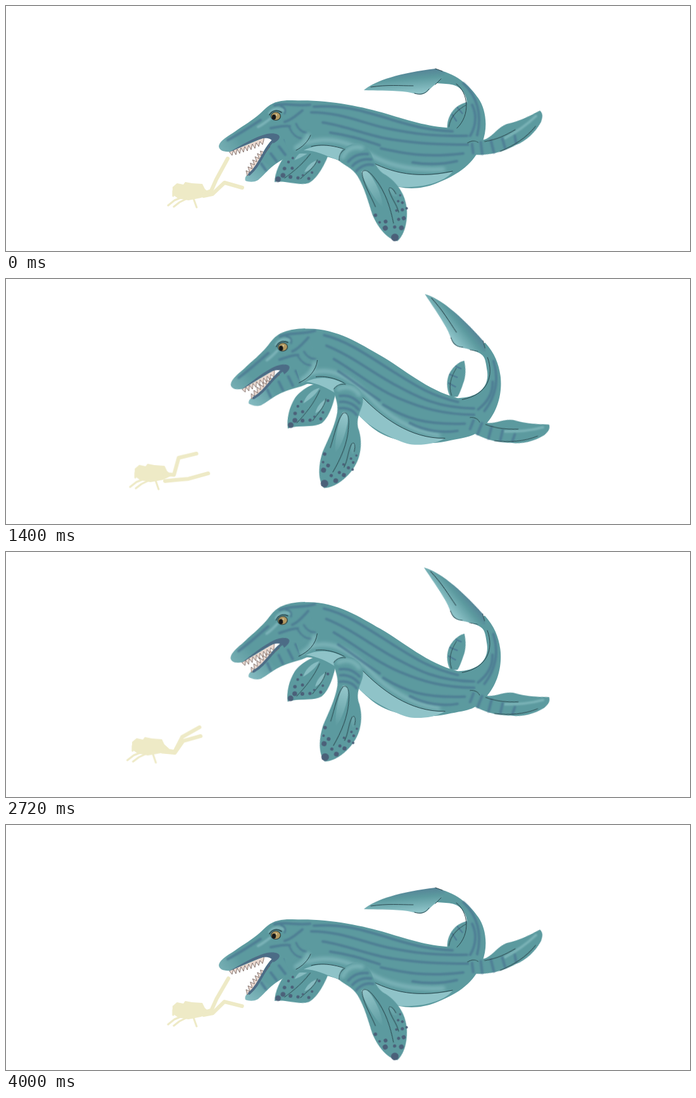
Animation of 1080x387 px, one loop 4040 ms. Source, as an HTML page without scripts:

```html
<!DOCTYPE html>
<html lang="en">
<head>
<meta charset="utf-8">
<title>Sea reptile chasing a diver</title>
<style>
  html, body { margin: 0; width: 100%; height: 100%; overflow: hidden; background: #fff; }
  svg { display: block; width: 100%; height: 100%; }

  /* Every part has three poses: --a low, --m middle, --b high. */
  .part, .morph, .swim { animation: part 4.04s infinite; }
  .morph { animation-name: morph; }
  .swim { animation-name: swim; }
  .kick { animation: morph-kick 1.01s infinite ease-in-out; }

  @keyframes part {
    0%, 100% { transform: var(--a); animation-timing-function: cubic-bezier(.47, 0, .745, .715); }
    24.75%, 77.5% { transform: var(--m); animation-timing-function: cubic-bezier(.39, .575, .565, 1); }
    51.1% { transform: var(--b); animation-timing-function: cubic-bezier(.47, 0, .745, .715); }
  }
  @keyframes morph {
    0%, 100% { d: var(--a); animation-timing-function: cubic-bezier(.47, 0, .745, .715); }
    24.75%, 77.5% { d: var(--m); animation-timing-function: cubic-bezier(.39, .575, .565, 1); }
    51.1% { d: var(--b); animation-timing-function: cubic-bezier(.47, 0, .745, .715); }
  }
  @keyframes morph-kick {
    0%, 100% { d: var(--a); }
    40% { d: var(--m); }
    78% { d: var(--b); }
  }
  @keyframes swim {
    0%, 100% { transform: translate(288px, 294px); animation-timing-function: ease-in; }
    24.75%, 75.5% { transform: translate(243px, 306px); animation-timing-function: linear; }
    51% { transform: translate(204px, 311px) rotate(2deg); animation-timing-function: ease-in; }
    86% { transform: translate(275px, 292px); animation-timing-function: ease-out; }
  }

  .skin { fill: #5c9a9f; }
  .pale { fill: #8fc3c8; }
  .stripe, .ink, .glow { fill: none; stroke-linecap: round; stroke-linejoin: round; }
  .stripe { stroke: #4a7391; stroke-width: 4; opacity: .72; }
  .glow { stroke: #90c4c8; stroke-width: 7; opacity: .6; }
  .ink { stroke: #29454c; stroke-width: 1; }
  .spot { fill: #4b6079; }
  .tooth { fill: #ead9d0; stroke: #6b5853; stroke-width: .8; stroke-linejoin: round; }

  .head { transform-origin: 426px 174px; --a: translate(0, 0) rotate(0deg); --m: translate(3px, -43px) rotate(-5.4deg); --b: translate(17px, -84px) rotate(-10.5deg); }
  .jaw { transform-origin: 428px 206px; --a: translate(0, 0) rotate(0deg); --m: translate(8px, -46px) rotate(6.7deg); --b: translate(25px, -85px) rotate(14.5deg); }
  .fluke { transform-origin: 683px 104px; --a: translate(0, 0) rotate(0deg); --m: translate(43.5px, -5px) rotate(36deg); --b: translate(88px, 5px) rotate(70deg); }
  .arm { transform-origin: 542px 200px; --a: translate(6px, 32px) rotate(-26.3deg); --m: translate(0, 0) rotate(0deg); --b: translate(0, -36px) rotate(26.5deg); }
  .far-arm { transform-origin: 434px 251px; --a: translate(-10px, 27px) rotate(7deg); --m: translate(0, 0) rotate(0deg); --b: translate(19px, -26px) rotate(-6deg); }
  .leg { transform-origin: 740px 228px; --a: translate(0, -4px) rotate(-20deg); --m: translate(0, 0) rotate(0deg); --b: translate(-2px, 5px) rotate(16deg); }
  .far-leg { transform-origin: 703px 187px; --a: translate(-3px, 5px) rotate(15deg); --m: translate(0, 0) rotate(0deg); --b: translate(3px, -4px) rotate(-23deg); }
</style>
</head>
<body>
<svg viewBox="0 0 1080 387" preserveAspectRatio="none">
  <defs>
    <filter id="soft" x="-20%" y="-40%" width="140%" height="180%"><feGaussianBlur stdDeviation="1.1"/></filter>
    <filter id="softer" x="-30%" y="-60%" width="160%" height="220%"><feGaussianBlur stdDeviation="2.4"/></filter>
    <linearGradient id="fin" x1="0" y1="0" x2=".25" y2="1">
      <stop offset=".1" stop-color="#527b93"/><stop offset=".5" stop-color="#5c9a9f"/><stop offset="1" stop-color="#8cc2c7"/>
    </linearGradient>
    <linearGradient id="snout" x1="336" y1="226" x2="366" y2="206" gradientUnits="userSpaceOnUse">
      <stop offset="0" stop-color="#77afb4"/><stop offset="1" stop-color="#5c9a9f"/>
    </linearGradient>
    <linearGradient id="chin" x1="382" y1="277" x2="408" y2="244" gradientUnits="userSpaceOnUse">
      <stop offset="0" stop-color="#84bac0"/><stop offset="1" stop-color="#5c9a9f"/>
    </linearGradient>
    <linearGradient id="streak" x1="0" y1="0" x2="0" y2="1">
      <stop offset="0" stop-color="#96c8cc"/><stop offset="1" stop-color="#5c9a9f"/>
    </linearGradient>
  </defs>

  <!-- diver -->
  <g class="swim" fill="#eeeac6">
    <path d="M-25,-8L-18,-14L-8,-12L-5,-16L6,-14L22,-13L26,-5L34,2L20,9L0,13L-16,10L-25,4Z"/>
    <g fill="none" stroke="#eeeac6" stroke-linecap="round" stroke-linejoin="round">
      <path stroke-width="3" d="M-10,8L-22,13L-32,21M-2,10L-14,16L-23,23M8,10L13,24M-24,-2L-24,6"/>
      <g stroke-width="6">
        <path class="kick" style="--a:path('M25,2L36,-2L44,-20L62,-53');--m:path('M22,0L37,1L44,-26L72,-33');--b:path('M23,4L43,7L55,-16L82,-33')"/>
        <path class="kick" style="--a:path('M24,6L38,3L57,-15L85,-7');--m:path('M23,11L40,9L60,7L91,-2');--b:path('M23,6L43,8L55,-13L82,-21')"/>
      </g>
    </g>
  </g>

  <!-- far limbs -->
  <g class="part far-leg">
    <path class="skin" d="M700,189C695,172 701,155 711,147C719,140 727,137 734,137C734,150 731,162 724,172C719,180 715,186 711,190Z"/>
    <path class="stripe" style="stroke-width:2.5" d="M707,153L717,160M702,166L711,174M719,143L726,148"/>
    <path class="ink" d="M702,186C700,170 708,157 719,146"/>
  </g>
  <g class="part far-arm">
    <path class="skin" d="M434,251C433,236 438,218 448,204C458,191 480,180 498,181L515,192C510,212 502,236 488,246C472,253 452,246 434,251Z"/>
    <path fill="#87bcc1" d="M461,213C464,203 475,192 488,190C483,199 472,207 461,213ZM479,230C481,220 489,212 496,209C494,219 488,226 479,230Z"/>
    <path class="ink" d="M449,243C462,231 478,214 488,194M474,241C482,231 493,222 497,208"/>
    <g class="spot">
      <circle cx="439" cy="246" r="4.5"/><circle cx="446" cy="239" r="3.8"/><circle cx="458" cy="240" r="3"/>
      <circle cx="447" cy="228" r="2.8"/><circle cx="459" cy="226" r="2.5"/><circle cx="452" cy="217" r="2.2"/>
      <circle cx="470" cy="240" r="2.6"/><circle cx="487" cy="239" r="2.5"/><circle cx="491" cy="229" r="2"/>
      <circle cx="500" cy="211" r="2.3"/><circle cx="458" cy="210" r="2"/><circle cx="477" cy="235" r="1.8"/>
    </g>
  </g>

  <!-- lower jaw -->
  <g class="part jaw">
    <path fill="url(#chin)" d="M378,276C376,270 381,266 386,262C400,250 404,224 426,206L448,196L474,216C462,232 448,236 436,243C415,255 407,268 398,275C391,279 383,278 378,276Z"/>
    <path class="tooth" d="M381,268l-2-8 6 3-3-9 6.700 3-3-9 6.700 3-3-8 6.700 3-3-8 6.700 3-3-8 6.700 3-2-7 6 2L417,222L384,266Z"/>
    <path fill="none" stroke="#4c6c86" stroke-width="4" stroke-linecap="round" d="M384,266C403,250 408,222 427,208"/>
    <path class="stripe" filter="url(#soft)" d="M403,249L410,259M418,233L427,245M431,222L441,235M441,211L453,227"/>
  </g>

  <!-- trunk and tail -->
  <path class="morph skin" style="
    --a:path('M445,150C500,146 560,158 600,170S670,192 712,193C730,172 732,150 722,136S702,124 680,122L682,101C715,108 735,130 746,146S762,190 752,216S725,262 680,280S600,282 570,266S505,228 450,234C435,215 432,170 445,150Z');
    --m:path('M450,103C510,98 555,122 590,138S665,184 718,191C742,180 752,158 746,140S738,118 713,112L733,96C752,110 762,130 768,148S774,198 758,224S735,250 697,259S610,268 580,250S510,186 456,188C445,165 440,125 450,103Z');
    --b:path('M462,63C515,52 555,84 592,108S665,170 710,186C745,194 772,182 770,150S768,122 754,112L774,104C786,122 790,138 790,156S786,205 762,228S735,247 695,254S600,252 570,218S505,140 474,150C465,125 452,85 462,63Z')"/>
  <g filter="url(#softer)">
    <path class="morph glow" style="
      --a:path('M476,216C510,206 540,214 575,235S650,260 690,258');
      --m:path('M476,172C510,162 545,175 576,205S645,247 685,250');
      --b:path('M492,130C515,122 545,140 572,172S640,236 680,244')"/>
  </g>
  <path class="morph pale" style="
    --a:path('M470,228C500,214 530,220 565,240S640,275 705,262C690,280 655,287 625,286S560,255 530,245S490,228 470,228Z');
    --m:path('M465,184C495,172 530,178 566,206S640,262 697,255C680,268 655,270 636,269S575,248 560,232S510,192 465,184Z');
    --b:path('M480,146C500,133 535,140 560,172S635,246 690,249C675,256 660,257 645,256S570,225 552,200S510,148 480,146Z')"/>
  <path class="morph ink" style="
    --a:path('M482,222C500,217 530,220 565,240S640,275 705,261');
    --m:path('M482,178C500,175 530,178 566,206S640,262 697,255');
    --b:path('M495,137C510,136 535,140 560,172S635,246 690,249')"/>

  <g filter="url(#soft)">
    <path class="morph stripe" style="
      --a:path('M486,159C540,156 570,168 610,180S670,196 705,198');
      --m:path('M492,110C540,118 570,137 610,158S670,188 712,196');
      --b:path('M510,73C540,83 575,111 610,136S670,181 715,193')"/>
    <path class="morph stripe" style="
      --a:path('M482,168C530,168 565,186 605,194S675,206 728,205');
      --m:path('M498,126C540,136 575,160 610,175S680,205 735,205');
      --b:path('M512,90C545,108 580,138 615,160S680,203 742,204')"/>
    <path class="morph stripe" style="
      --a:path('M500,184C540,190 570,205 610,211S680,219 730,219');
      --m:path('M512,146C545,160 580,184 620,197S690,215 738,214');
      --b:path('M522,112C550,132 585,164 620,182S690,213 740,215')"/>
    <path class="morph stripe" style="
      --a:path('M512,200C540,204 560,210 590,220');
      --m:path('M520,164C545,176 560,186 590,202');
      --b:path('M528,132C548,148 562,162 590,184')"/>
    <path class="morph stripe" style="
      --a:path('M592,225C630,233 660,240 722,233');
      --m:path('M595,210C630,226 660,236 725,229');
      --b:path('M596,190C630,215 660,227 724,228')"/>
    <path class="morph stripe" style="
      --a:path('M642,247C665,251 690,250 712,245');
      --m:path('M640,236C665,246 690,246 714,241');
      --b:path('M636,221C660,236 690,242 712,239')"/>
    <path class="morph stripe" style="
      --a:path('M722,122C744,142 752,172 744,204');
      --m:path('M756,124C768,150 768,182 752,206');
      --b:path('M780,134C785,160 780,184 758,210')"/>
    <path class="morph stripe" style="
      --a:path('M736,156C744,172 742,190 733,205');
      --m:path('M758,160C762,178 754,194 742,206');
      --b:path('M776,164C774,182 764,196 748,206')"/>
  </g>
  <path class="morph ink" style="
    --a:path('M711,123C730,137 734,172 712,193');
    --m:path('M750,124C762,152 750,182 718,191');
    --b:path('M768,124C778,154 768,184 722,190')"/>

  <!-- tail fluke -->
  <g class="part fluke">
    <path fill="url(#fin)" d="M565,133C584,117 622,106 678,99L694,105C690,116 680,122 675,126C668,132 664,139 655,140C645,139 638,136 626,135C604,133 584,134 565,133Z"/>
    <path class="ink" d="M576,128C602,124 622,126 643,126M645,138C655,141 662,139 668,131M678,99L689,103M687,115L678,124"/>
  </g>

  <!-- near hind flipper -->
  <g class="part leg">
    <path class="skin" d="M733,220C742,212 752,221 762,221C776,219 786,210 800,210C824,213 840,210 857,208C860,214 858,219 852,226C838,238 820,246 803,246C786,249 762,249 738,239Z"/>
    <path class="glow" filter="url(#soft)" style="stroke-width:4" d="M790,230C812,227 830,222 848,214"/>
    <path class="stripe" filter="url(#soft)" d="M738,221L735,235M752,223L748,241M768,226L766,245M786,229L785,245M806,232L804,243"/>
    <path class="ink" d="M758,224C778,228 794,226 810,223M776,247C800,246 822,241 842,229M732,217C740,215 746,218 748,222"/>
  </g>

  <!-- near front flipper -->
  <g class="part arm">
    <path class="skin" d="M517,202C520,188 536,184 549,188C562,192 567,202 567,214C566,228 564,238 570,250C580,264 585,282 583,300C580,326 560,352 543,356C530,346 525,324 526,302C529,280 534,258 532,236C530,220 521,212 517,202Z"/>
    <path class="glow" filter="url(#softer)" d="M524,199C534,190 548,190 558,199"/>
    <path fill="url(#streak)" d="M540,233C546,229 551,236 552,248C554,268 551,288 546,298C540,282 537,252 540,233ZM567,277C571,272 575,280 574,292C571,294 567,288 567,277Z"/>
    <path class="stripe" filter="url(#soft)" d="M529,209C540,204 552,206 562,212M532,218C544,213 556,217 563,222M534,228C545,223 556,226 562,231"/>
    <path class="ink" d="M536,292C537,270 535,248 541,234C548,229 553,240 555,252C561,278 556,306 550,328M565,316C568,304 564,290 567,277C570,272 574,278 574,288M517,201C520,193 526,190 533,189"/>
    <g class="spot">
      <circle cx="542" cy="349" r="6"/><circle cx="535" cy="329" r="4"/><circle cx="530" cy="304" r="2.800"/>
      <circle cx="558" cy="340" r="3.800"/><circle cx="549" cy="334" r="2.600"/><circle cx="540" cy="320" r="3"/>
      <circle cx="568" cy="328" r="3.200"/><circle cx="560" cy="326" r="2.500"/><circle cx="572" cy="315" r="2.600"/>
      <circle cx="577" cy="305" r="2.200"/><circle cx="579" cy="316" r="2"/><circle cx="563" cy="312" r="2"/>
      <circle cx="572" cy="300" r="2"/><circle cx="531" cy="317" r="2"/><circle cx="579" cy="293" r="1.800"/>
    </g>
  </g>

  <!-- head -->
  <g class="part head">
    <path class="tooth" d="M353,231l4 5 2-8 4 7 2-9 4 7 2-9 4 7 2-9 4 7 2-9 4 7 2-9 4 7 2-9 4 6 2-8 4 5 2-7L408,203L354,226Z"/>
    <path fill="url(#snout)" d="M336,221C338,212 350,206 362,198C376,188 390,180 400,171C410,162 416,154 430,151C442,148 454,149 465,150L474,190L452,214L430,207C420,203 410,207 400,211C384,218 368,224 354,230C344,231 336,228 336,221Z"/>
    <path fill="#4c6c86" d="M352,231C372,220 392,207 412,202C422,200 432,202 432,207C431,212 427,214 422,217C421,210 414,208 406,209C388,214 370,224 352,231Z"/>
    <g filter="url(#soft)">
      <path class="glow" style="stroke-width:4" d="M398,191C406,187 412,182 417,178M416,169C421,162 430,160 438,165"/>
      <path class="stripe" d="M350,212C372,200 390,188 402,180M424,157C440,152 458,159 480,156M440,183C452,180 460,171 468,165M418,193C430,191 440,188 448,190"/>
      <path class="stripe" style="stroke-width:3" d="M448,193C452,202 459,208 466,209M458,186C461,194 468,200 474,200M440,170C442,164 440,160 434,158"/>
    </g>
    <ellipse cx="426" cy="174" rx="7.500" ry="6.500" fill="#b49a62" stroke="#2b3b3c" stroke-width="1.200"/>
    <ellipse cx="423" cy="175.500" rx="3.200" ry="4" fill="#16181a"/>
    <circle cx="427" cy="172" r="1" fill="#e8dcc0"/>
    <path class="ink" d="M416,172C420,165 428,163 435,168" style="stroke-width:1.600"/>
  </g>
  <path class="morph glow" filter="url(#softer)" style="
    --a:path('M458,224C468,219 474,212 477,204');
    --m:path('M456,182C468,176 476,166 479,156');
    --b:path('M476,142C486,136 492,126 494,116')"/>
  <path class="morph ink" style="
    --a:path('M458,228C468,223 477,214 481,204');
    --m:path('M450,187C467,180 480,168 483,152');
    --b:path('M472,147C486,140 497,128 498,111')"/>
</svg>
</body>
</html>
```
